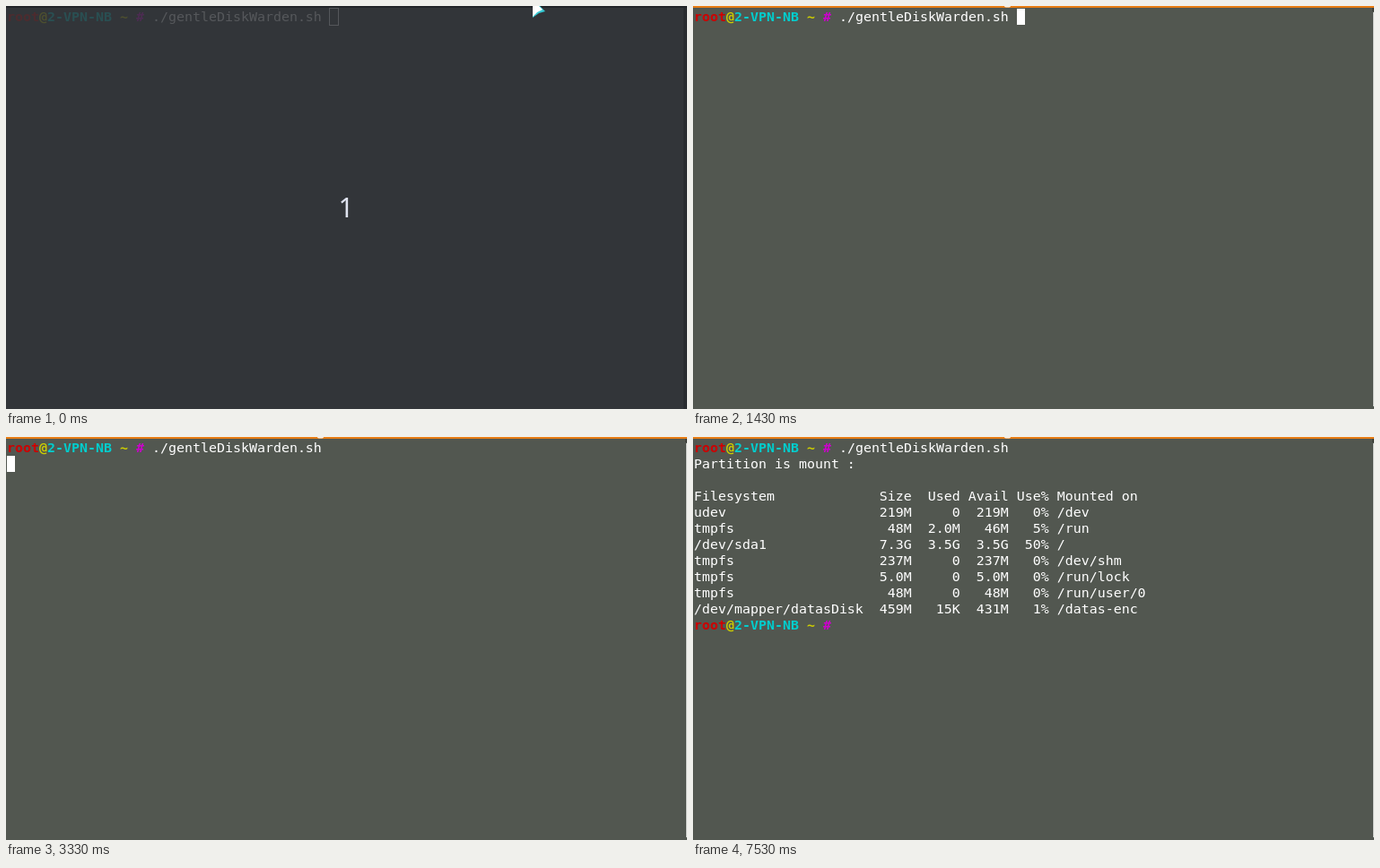
Recreate the animation shown at these times as an HTML page. Size 759 px wide and 450 px high, loop 8 s.

```html
<!DOCTYPE html>
<html lang="en">
<head>
<meta charset="utf-8">
<title>Terminal session</title>
<style>
  html, body { margin: 0; width: 100%; height: 100%; overflow: hidden; background: #525750; }
  svg { display: block; width: 759px; height: 450px; }
  text { font: 14.95px "DejaVu Sans Mono", "Noto Sans Mono", monospace; white-space: pre; }
  .bold { font-weight: 700; }
  .count { font: 30px "Noto Sans", "Open Sans", sans-serif; }
</style>
</head>
<body>
<svg id="stage" viewBox="0 0 759 450"></svg>
<script>
const NS = "http://www.w3.org/2000/svg";
const LOOP = 8000, CELL_W = 9, CELL_H = 18;
const BG = "#525750", GREY = "#e5e5e5", BLUE = "#0000ee", RED = "#cd0000";
const stage = document.getElementById("stage");

function add(parent, tag, attrs = {}, content = "") {
  const el = document.createElementNS(NS, tag);
  for (const key in attrs) el.setAttribute(key, attrs[key]);
  el.textContent = content;
  return parent.appendChild(el);
}
const group = (parent = stage) => add(parent, "g");
const rect = (parent, x, y, width, height, fill) =>
  add(parent, "rect", { x, y, width, height, fill });
const left = col => 1 + col * CELL_W;
const rowTop = row => 3 + row * CELL_H;
const cells = (parent, col, row, cols, rows, fill) =>
  rect(parent, left(col), rowTop(row), cols * CELL_W, rows * CELL_H, fill);
const write = (parent, col, row, str, fill, bold = false, dy = 0) =>
  add(parent, "text", { x: left(col), y: rowTop(row) + 14 + dy, fill, class: bold ? "bold" : "" }, str);

function prompt(parent, row) {
  write(parent, 0, row, "root", RED, true);
  write(parent, 4, row, "@", "#cdcd00", true);
  write(parent, 5, row, "2-VPN-NB", "#00cdcd", true);
  write(parent, 14, row, "~", "#cdcd00", true);
  write(parent, 16, row, "#", "#cd00cd", true);
}

// Terminal window
const back = rect(stage, 0, 0, 759, 450, BG);
const shell = group();
prompt(shell, 0);
write(shell, 18, 0, "./gentleDiskWarden.sh", "#fff");
const hollow = add(shell, "rect", { x: 360.5, y: 2.5, width: 10, height: 19, fill: "none", stroke: "#fff" });
const lineCursor = cells(stage, 40, 0, 1, 1, "#fff");
const waitCursor = cells(stage, 0, 1, 1, 1, "#fff");

// Disk report
const report = group();
write(report, 0, 1, "Partition is mount :", "#fff");
[
  "Filesystem Size Used Avail Use% Mounted on",
  "udev 219M 0 219M 0% /dev",
  "tmpfs 48M 2.0M 46M 5% /run",
  "/dev/sda1 7.3G 3.5G 3.5G 50% /",
  "tmpfs 237M 0 237M 0% /dev/shm",
  "tmpfs 5.0M 0 5.0M 0% /run/lock",
  "tmpfs 48M 0 48M 0% /run/user/0",
  "/dev/mapper/datasDisk 459M 15K 431M 1% /datas-enc"
].forEach((line, i) => {
  const [name, size, used, avail, use, ...mount] = line.split(" ");
  const str = name.padEnd(22) + size.padStart(5) + used.padStart(6) +
    avail.padStart(6) + use.padStart(5) + " " + mount.join(" ");
  write(report, 0, 3 + i, str, "#fff");
});
prompt(report, 11);

// Passphrase dialog
const dialog = group();
cells(dialog, 0, 0, 83, 24, BLUE);
cells(dialog, 12, 8, 60, 10, "#000");
cells(dialog, 11, 7, 60, 10, GREY);
add(dialog, "path", {
  d: "M275.5 138.5H104.5V300.5H635.5V138.5H455.5M275.5 129V147M455.5 129V147",
  fill: "none", stroke: "#000"
});
write(dialog, 32, 7, "Decrypt partition", RED);
write(dialog, 13, 8, "Encryption passphrase", "#000");
write(dialog, 26, 14, "<Ok>", "#000");
write(dialog, 48, 14, "<Cancel>", "#000");
cells(dialog, 13, 10, 56, 1, BLUE);
const blank = rect(dialog, left(13), 200, 56 * CELL_W, 1, GREY);
const stars = write(dialog, 13, 10, "*".repeat(55), GREY, false, 2);
const fieldCursor = group(dialog);
cells(fieldCursor, 13, 10, 1, 1, GREY);
rect(fieldCursor, left(13), 200, 9, 1, BLUE);

// Window edges, unfocused and focused
const idle = group();
rect(idle, 0, 0, 759, 2, "#000");
rect(idle, 755, 2, 4, 448, "#2d2e2b");
rect(idle, 758, 7, 1, 440, "#70736e");
const focus = group();
rect(focus, 0, 0, 759, 2, "#e67c14");
add(focus, "ellipse", { cx: 350.5, cy: 0, rx: 3.5, ry: 1.5, fill: "#f4eee6" });
rect(focus, 757, 2, 2, 4, "#3f423c");
rect(focus, 758, 7, 1, 440, "#d8dad6");

// Countdown screen
const countdown = group();
rect(countdown, 0, 0, 759, 2, "#222529");
rect(countdown, 755, 2, 4, 448, "#292c30");
add(countdown, "text", { x: 379, y: 236, fill: "#dfe3f0", class: "count", "text-anchor": "middle" }, "1");
add(countdown, "path", { d: "M587 0H595L601 6L594 8L587 13Z", fill: "#35c8d2" });
add(countdown, "path", { d: "M587 0H594L598 4L592 7L587 12Z", fill: "#fff" });

const show = (el, on) => el.setAttribute("visibility", on ? "inherit" : "hidden");
const within = (t, a, b) => t >= a && t < b;
const blink = (t, start) => Math.floor((t - start) / 600) % 2 === 0;

function draw(t) {
  const intro = t < 30;
  const step = Math.floor((t - 630) / 40) + 1;
  const k = Math.max(0, Math.min(1, step / 7));
  const asking = within(t, 1470, 3330);
  const typed = t >= 3000;

  back.setAttribute("fill", intro ? "#323539" : BG);
  shell.setAttribute("opacity", intro ? 0.17 : 0.78 + 0.22 * k);
  show(hollow, t < 630);
  show(lineCursor, within(t, 630, 1230) || within(t, 1430, 1470));
  show(waitCursor, within(t, 3330, 7530) && blink(t, 3300));

  show(dialog, asking);
  show(blank, asking && !typed);
  show(stars, asking && typed);
  show(fieldCursor, asking && !within(t, 2030, 2630));
  fieldCursor.setAttribute("transform", `translate(${typed ? 55 * CELL_W : 0} 0)`);

  show(report, t >= 7530);
  show(countdown, intro);
  show(idle, !intro && k < 1);
  idle.setAttribute("opacity", 1 - k);
  show(focus, k > 0);
  focus.setAttribute("opacity", k);
}

const start = performance.now();
function tick() {
  draw((performance.now() - start) % LOOP);
  requestAnimationFrame(tick);
}
draw(0);
requestAnimationFrame(tick);
</script>
</body>
</html>
```
